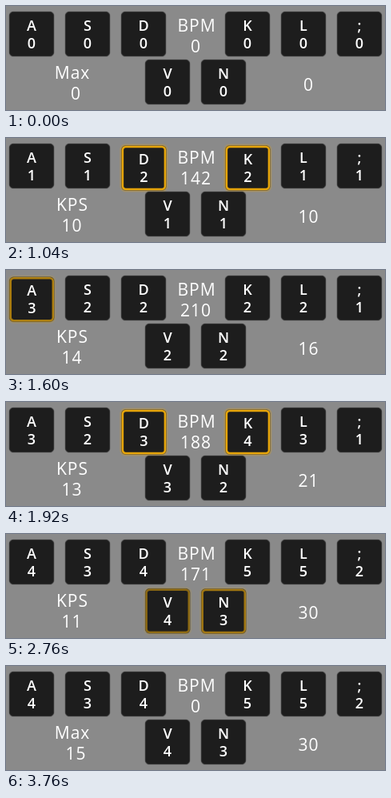
Animation of 474x130 px, one loop 4120 ms. Source, as an HTML page:

```html
<!DOCTYPE html>
<html lang="en">
<head>
<meta charset="utf-8">
<title>Key counter overlay</title>
<style>
  html, body { margin: 0; width: 100%; height: 100%; overflow: hidden; background: #8a8a8a; }
  svg { display: block; width: 474px; height: 130px; }
  text { fill: #fff; text-anchor: middle; font-family: "Open Sans", "Noto Sans", sans-serif; }
  .key text { font-size: 18px; font-weight: 600; }
  .stat { font-size: 21px; font-weight: 500; letter-spacing: 1px; }
</style>
</head>
<body>
<svg id="stage" viewBox="0 0 474 130"></svg>
<script>
const LOOP = 4120, STEP = 40;
const WINDOW = 1000;      // span over which presses per second are counted
const SMOOTHING = 22;     // time constant of the BPM readout
const HOLD = 60, FADE = 120;

const layout = {
  A: [4, 7], S: [74, 7], D: [144, 7], K: [274, 7], L: [344, 7], ";": [414, 7],
  V: [174, 67], N: [244, 67]
};

// [keys, time, hold]
const chords = [
  ["SL", 400], ["K", 600, 20], ["D", 662], ["A;", 760], ["VN", 825],
  ["DK", 1010], ["A", 1120], ["S", 1230], ["L", 1281, 20], ["VN", 1395],
  ["A", 1500], ["KV", 1640], ["L", 1740], ["DK", 1890], ["SL", 2040],
  ["A;", 2200, 120], ["DK", 2400], ["L", 2500], ["V", 2640], ["N", 2652]
];
const presses = chords.flatMap(([keys, time, hold = HOLD]) =>
  [...keys].map(key => ({ key, time, hold })));

const stage = document.getElementById("stage");

function add(parent, tag, attributes, content = "") {
  const node = document.createElementNS("http://www.w3.org/2000/svg", tag);
  for (const name in attributes) node.setAttribute(name, attributes[name]);
  node.textContent = content;
  return parent.appendChild(node);
}

function makeKey(name, [x, y]) {
  const group = add(stage, "g", { class: "key" });
  const box = (inset, radius, style) => add(group, "rect", {
    x: inset, y: inset, width: 56 - 2 * inset, height: 56 - 2 * inset, rx: radius, ...style
  });
  box(-0.5, 5.5, { fill: "#000", opacity: 0.22 });
  box(0.5, 4.5, { fill: "#1d1d1d", stroke: "#303030" });
  const glow = box(0, 5, { fill: "none", stroke: "#e6a50a", "stroke-width": 4, opacity: 0.25 });
  const rim = box(1.5, 4, { fill: "none", stroke: "#e6a50a", "stroke-width": 2.5 });
  add(group, "text", { x: 28, y: 23.5 }, name);
  const count = add(group, "text", { x: 28, y: 45.5 });
  return { name, x, y, group, glow, rim, count };
}

const keys = Object.entries(layout).map(([name, place]) => makeKey(name, place));
const stat = (x, y, content) => add(stage, "text", { class: "stat", x, y }, content);
stat(238.5, 32, "BPM");
const bpmText = stat(237.5, 58);
const rateLabel = stat(83, 91);
const rateText = stat(82.5, 117);
const totalText = stat(378.5, 106);

const clamp = value => Math.max(0, Math.min(1, value));
const settle = age => age > 0 ? 1 - Math.exp(-age / SMOOTHING) : 0;
const rateAt = t => presses.filter(p => p.time <= t && t - p.time <= WINDOW).length;
const bpmAt = t => 15 * presses.reduce((sum, p) =>
  sum + settle(t - p.time) - settle(t - p.time - WINDOW), 0);
const peakAt = t => Math.max(0, ...presses.filter(p => p.time <= t).map(p => rateAt(p.time)));

function drawKey(key, past, t) {
  const own = past.filter(p => p.key === key.name);
  const last = own.at(-1);
  const lit = last ? clamp(1 - (t - last.time - last.hold) / FADE) : 0;
  key.group.setAttribute("transform", `translate(${key.x + 0.4 * lit} ${key.y + 2.5 * lit})`);
  key.rim.setAttribute("opacity", lit);
  key.glow.setAttribute("opacity", 0.25 * lit);
  key.count.textContent = own.length;
}

function draw(t) {
  const past = presses.filter(p => p.time <= t);
  const rate = rateAt(t);
  keys.forEach(key => drawKey(key, past, t));
  bpmText.textContent = Math.round(bpmAt(t));
  rateLabel.textContent = rate ? "KPS" : "Max";
  rateText.textContent = rate || peakAt(t);
  rateText.setAttribute("x", rate ? 82.5 : 87.5);
  totalText.textContent = past.length;
}

const start = performance.now();
function tick() {
  const t = (performance.now() - start) % LOOP;
  draw(Math.floor(t / STEP) * STEP);
  requestAnimationFrame(tick);
}
tick();
</script>
</body>
</html>
```
